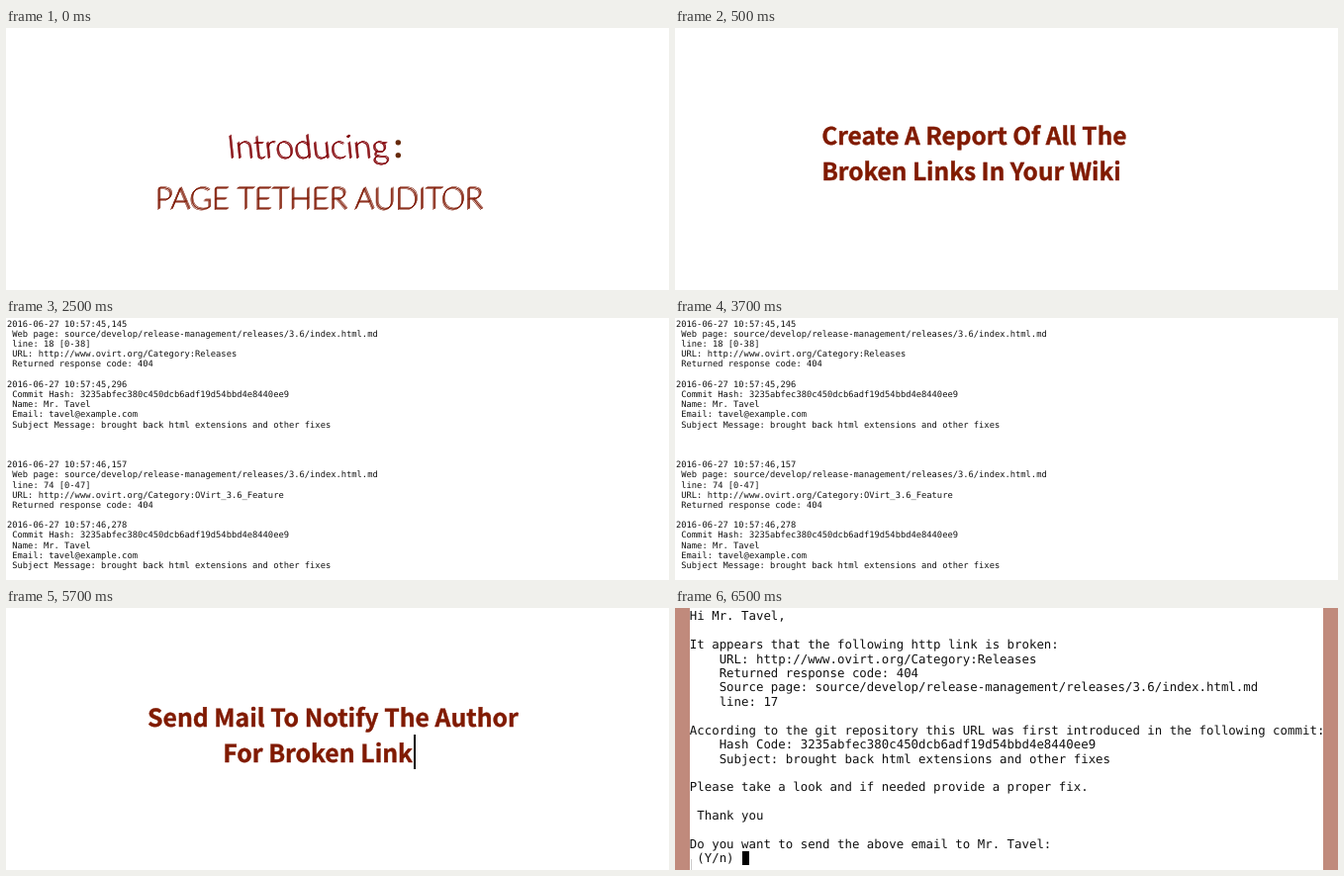
Write an HTML page that moves like this. It is 670 by 265 pixels and loops after 8000 ms.

```html
<!DOCTYPE html>
<html lang="en">
<head>
<meta charset="utf-8">
<title>Broken link report</title>
<style>
  html, body { margin: 0; width: 100%; height: 100%; overflow: hidden; background: #fff; }
  svg { display: block; width: 670px; height: 265px; }
  text { white-space: pre; text-rendering: geometricPrecision; }
  .pen { font-family: Lato, "Open Sans", sans-serif; font-weight: 200; }
  .bold {
    font-family: "Noto Sans CJK SC", "Noto Sans CJK JP", "Open Sans", sans-serif;
    font-weight: 700; fill: #801a02; stroke: #801a02; stroke-width: 0.4px;
  }
  .mono { font-family: "DejaVu Sans Mono", monospace; fill: #111; }
</style>
</head>
<body>
<svg id="stage" viewBox="0 0 670 265" xmlns="http://www.w3.org/2000/svg"></svg>
<script>
const NS = "http://www.w3.org/2000/svg";
const stage = document.getElementById("stage");
const LOOP = 8000;

function add(parent, tag, attrs, content) {
  const el = document.createElementNS(NS, tag);
  for (const key in attrs) el.setAttribute(key, attrs[key]);
  if (content !== undefined) el.textContent = content;
  parent.appendChild(el);
  return el;
}

const scene = () => add(stage, "g", { visibility: "hidden" });
const rect = (g, x, y, width, height, fill) => add(g, "rect", { x, y, width, height, fill });
const bold = (g, x, y, size, str) => add(g, "text", { class: "bold", x, y, "font-size": size }, str);

// Text swept along a slanted nib, so "\" strokes are thick and "/" strokes thin.
function penText(g, id, x, y, lean, attrs, str) {
  const line = add(g, "g", { transform: `translate(${x} ${y}) skewX(${lean})` });
  add(line, "text", { id, class: "pen", ...attrs }, str);
  for (let k = -1; k <= 1; k += 0.25)
    add(line, "use", { href: "#" + id, x: k * 1.1, y: -k * 0.85 });
}

function monoLines(g, x, y, size, step, lines) {
  lines.forEach((line, i) => {
    if (line) add(g, "text", { class: "mono", x, y: y + i * step, "font-size": size }, line);
  });
}

const page = "source/develop/release-management/releases/3.6/index.html.md";
const site = "http://www.ovirt.org/Category:";
const hash = "3235abfec380c450dcb6adf19d54bbd4e8440ee9";
const subject = "brought back html extensions and other fixes";
const author = "Mr. Tavel";

function logEntry(found, line, category, blamed) {
  return [
    "2016-06-27 10:57:" + found,
    " Web page: " + page,
    " line: " + line,
    " URL: " + site + category,
    " Returned response code: 404",
    "",
    "2016-06-27 10:57:" + blamed,
    " Commit Hash: " + hash,
    " Name: " + author,
    " Email: tavel@example.com",
    " Subject Message: " + subject
  ];
}

function intro() {
  const g = scene();
  penText(g, "lead", 225, 131.5, 6, { "font-size": 33, "letter-spacing": 0.5, fill: "#820308" }, "Introducing");
  add(g, "text", {
    x: 391.8, y: 131, "font-size": 32, "font-weight": 700,
    "font-family": "Open Sans, sans-serif", fill: "#662a0c"
  }, ":");
  penText(g, "name", 316.5, 183, 0, { "font-size": 30.5, "text-anchor": "middle", fill: "#7f1a05" }, "PAGE TETHER AUDITOR");
  return g;
}

function reportTitle() {
  const g = scene();
  bold(g, 148.2, 118, 24.45, "Create A Report Of All The");
  bold(g, 148.2, 153.5, 24.45, "Broken Links In Your Wiki");
  return g;
}

function report() {
  const g = scene();
  monoLines(g, 1, 8.7, 8.77, 10.18, [
    ...logEntry("45,145", "18 [0-38]", "Releases", "45,296"),
    "", "", "",
    ...logEntry("46,157", "74 [0-47]", "OVirt_3.6_Feature", "46,278")
  ]);
  return g;
}

function mailTitle() {
  const g = scene();
  bold(g, 143, 120, 24.8, "Send Mail To Notify The Author");
  bold(g, 219.2, 156, 24.8, "For Broken Link");
  rect(g, 412, 128, 2, 35, "#000");
  return g;
}

function mail() {
  const g = scene();
  rect(g, 0, 0, 15, 265, "#c08a7c");
  rect(g, 655, 0, 15, 265, "#c08a7c");
  rect(g, 16, 254, 1, 11, "#ccc");
  monoLines(g, 14.8, 12.4, 12.4, 14.41, [
    "Hi " + author + ",",
    "",
    "It appears that the following http link is broken:",
    "    URL: " + site + "Releases",
    "    Returned response code: 404",
    "    Source page: " + page,
    "    line: 17",
    "",
    "According to the git repository this URL was first introduced in the following commit:",
    "    Hash Code: " + hash,
    "    Subject: " + subject,
    "",
    "Please take a look and if needed provide a proper fix.",
    "",
    " Thank you",
    "",
    "Do you want to send the above email to " + author + ":",
    " (Y/n) "
  ]);
  rect(g, 68, 246, 7, 14, "#000");
  return g;
}

const scenes = [intro(), reportTitle(), report(), mailTitle(), mail()];
const starts = [0, 500, 2500, 4500, 6500];

function draw(t) {
  const current = starts.filter(s => s <= t).length - 1;
  scenes.forEach((g, i) => g.setAttribute("visibility", i === current ? "visible" : "hidden"));
}

const begin = performance.now();
function tick() {
  draw((performance.now() - begin) % LOOP);
  requestAnimationFrame(tick);
}
tick();
</script>
</body>
</html>
```
